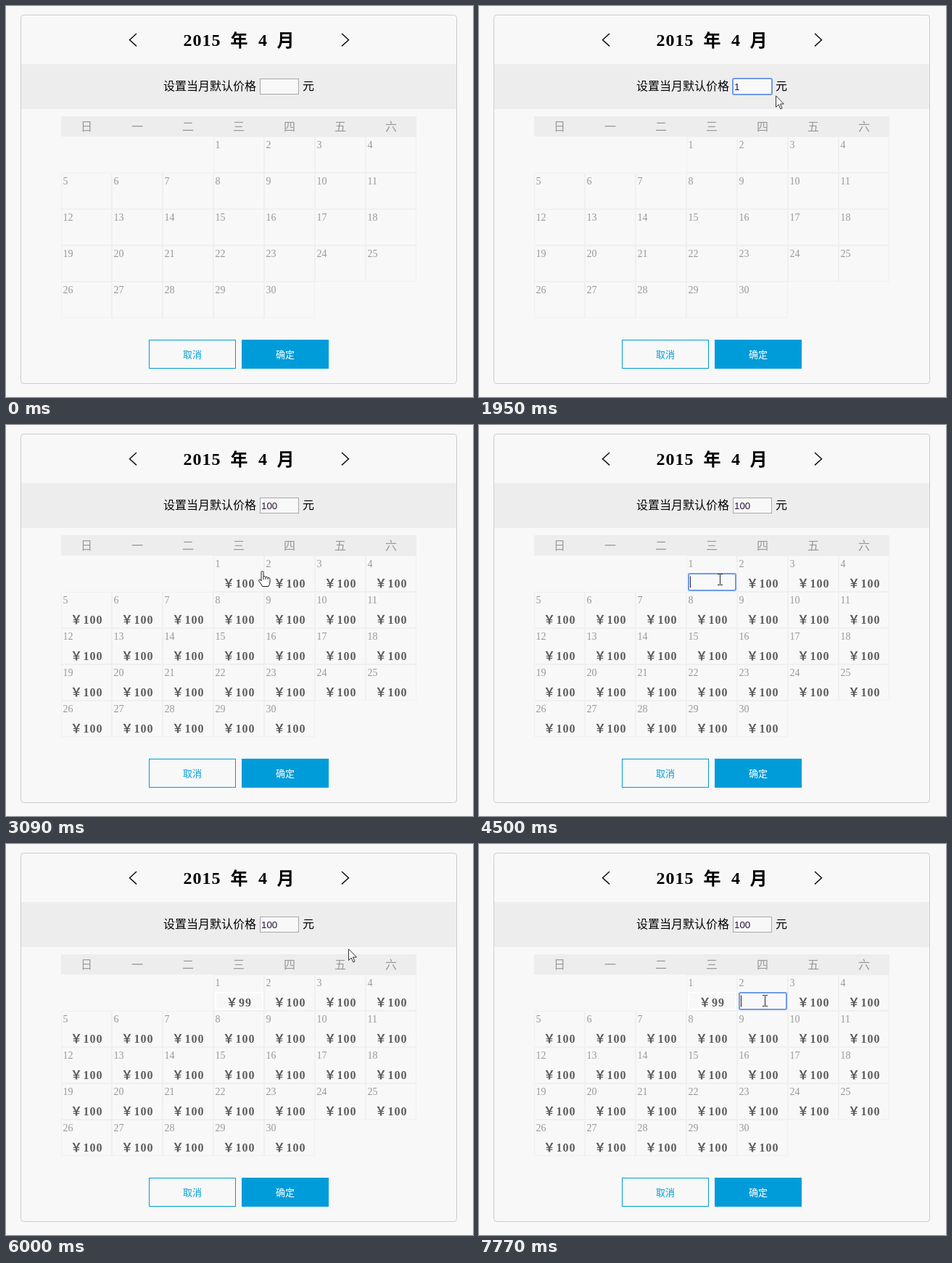
An HTML page for the animation above (8000 ms loop, 644 px wide and 539 px high).

```html
<!DOCTYPE html>
<html lang="zh-CN">
<head>
<meta charset="utf-8">
<title>价格日历</title>
<style>
  html, body { margin: 0; width: 100%; height: 100%; overflow: hidden; background: #f8f8f8; }
  svg { display: block; width: 644px; height: 539px; }
  text { font-family: "Noto Sans CJK SC", "Noto Sans CJK", sans-serif; font-size: 16px; }
  .mid { text-anchor: middle; }
  .num { font-family: "Liberation Serif", serif; }
  .title { font-size: 24px; font-weight: 700; letter-spacing: 1px; }
  .day { font-size: 14px; fill: #999; }
  .week { fill: #999; }
  .price { fill: #5c5c5c; font-weight: 700; }
  .price.num { letter-spacing: 1px; }
  .btn { font-size: 13px; }
  .value { font-family: "Liberation Sans", Arial, sans-serif; font-size: 13.333px; fill: #2a1440; }
</style>
</head>
<body>
<svg id="stage" viewBox="0 0 644 539"></svg>
<script>
const LOOP = 8000, STEP = 30, BLINK = 480, BLUE = '#009cd9';
const stage = document.getElementById('stage');

function add(tag, attrs, parent = stage) {
  const el = document.createElementNS('http://www.w3.org/2000/svg', tag);
  for (const k in attrs) el.setAttribute(k, attrs[k]);
  return parent.appendChild(el);
}
const group = (parent) => add('g', {}, parent);
const show = (el, on) => el.setAttribute('visibility', on ? 'visible' : 'hidden');

function box(x, y, width, height, fill, stroke, rx = 0, parent = stage) {
  const o = stroke ? 0.5 : 0;
  return add('rect', { x: x + o, y: y + o, width: width - 2 * o, height: height - 2 * o,
    fill, stroke: stroke || 'none', rx }, parent);
}
function label(str, x, y, cls = '', parent = stage, fill) {
  const el = add('text', { x, y, class: cls }, parent);
  if (fill) el.style.fill = fill;
  el.textContent = str;
  return el;
}
function line(d, parent = stage, stroke = '#111', width = 1.5, fill = 'none') {
  return add('path', { d, fill, stroke, 'stroke-width': width }, parent);
}

// Panel
box(20, 12, 602, 509, '#f8f8f8', '#ccc', 4);
box(21, 80, 600, 62, '#ededed');
line('M180 38L170.5 46.7L180 55.4M463 38L472.5 46.7L463 55.4');
label('2015', 244.5, 55, 'title num');
label('年', 309.5, 56, 'title');
label('4', 348, 55, 'title num');
label('月', 373.5, 56, 'title');
label('设置当月默认价格', 217, 116);
label('元', 409, 116);

// Calendar
box(76, 152, 490, 28, '#ededed');
[...'日一二三四五六'].forEach((c, i) => label(c, 111 + 70 * i, 172, 'week mid'));

const cellX = (day) => 76 + 70 * ((day + 2) % 7);
const cellY = (day) => 180 + 50 * Math.floor((day + 2) / 7);

function price(day, amount, parent) {
  const x = cellX(day) + 35 - (17 + 9 * amount.length) / 2, y = cellY(day) + 44;
  const g = group(parent);
  label('￥', x, y, 'price', g);
  label(amount, x + 17.5, y, 'price num', g);
  return g;
}
for (let d = 1; d <= 30; d++) {
  box(cellX(d), cellY(d), 70, 50, 'none', '#f0f0f0');
  label(d, cellX(d) + 2.5, cellY(d) + 16, 'day num');
}
const prices = group();
const first = price(1, '100', prices);
const second = price(2, '100', prices);
for (let d = 3; d <= 30; d++) price(d, '100', prices);
const changed = group();
add('rect', { x: 289, y: 205, width: 65, height: 23, fill: 'none', stroke: '#fff', 'stroke-width': 2 }, changed);
price(1, '99', changed);

// Buttons
box(197, 460, 120, 40, '#f8f8f8', BLUE);
box(325, 460, 120, 40, BLUE);
label('取消', 257, 485, 'btn mid', stage, BLUE);
label('确定', 385, 485, 'btn mid', stage, '#fff');

// Text fields; typed holds [time, value], caret restarts its blink at each time in marks
function field(x, y, w, h, opts) {
  const g = group();
  const plain = box(x, y, w, h, '#f8f8f8', '#a9a9a9', 0, g);
  const ring = group(g);
  add('rect', { x, y, width: w, height: h, rx: 2, fill: '#f9f9f9', stroke: '#6f9be6', 'stroke-width': 2 }, ring);
  const value = label('', x + 2, y + h / 2 + 5, 'value', g);
  const caret = box(x + 2, y + h / 2 - 8, 1, 16, '#222', null, 0, g);
  return { x, y, w, h, g, plain, ring, value, caret, ...opts };
}
const fields = [
  field(350, 100, 54, 22, { focus: 1020, blur: 2610, stays: true, marks: [1020, 1320, 2040, 2190],
    typed: [[1290, '1'], [2040, '10'], [2190, '100']] }),
  field(289, 205, 65, 23, { focus: 3510, blur: 5820, marks: [3540, 4830, 4980],
    typed: [[4830, '9'], [4980, '99']] }),
  field(359, 205, 65, 23, { focus: 6780, blur: LOOP, marks: [6810], typed: [] })
];
const focused = (f, t) => t >= f.focus && t < f.blur;

function drawField(f, t) {
  const on = focused(f, t);
  const text = f.typed.reduce((s, [at, v]) => t >= at ? v : s, '');
  const mark = f.marks.reduce((m, at) => t >= at ? at : m, Infinity);
  show(f.g, on || f.stays);
  show(f.plain, f.stays);
  show(f.ring, on);
  f.value.textContent = text;
  f.value.setAttribute('visibility', on || f.stays ? 'visible' : 'hidden');
  f.caret.setAttribute('x', f.x + 2 + Math.floor(7.41 * text.length));
  show(f.caret, on && t >= mark && Math.floor((t - mark) / BLINK) % 2 === 0);
}

// Pointer shapes, each with its hot spot at 0,0
const pointer = group();
const shapes = { arrow: group(pointer), beam: group(pointer), hand: group(pointer) };
line('M.5 .8V16.4L4.2 12.9L6.8 18.9L9 18L6.4 12H11.4Z', shapes.arrow, '#333', 1, '#fff');
line('M-3 -7.5H-.5Q.5 -7.5 .5 -6.5V6.5Q.5 7.5 -.5 7.5H-3M4 -7.5H1.5Q.5 -7.5 .5 -6.5M4 7.5H1.5Q.5 7.5 .5 6.5',
  shapes.beam, '#222', 1);
line('M-2 14V2Q-2 .5 -.5 .5T1 2V8Q3.5 6.8 4 8.6Q6.5 7.6 7 9.4Q10 8.8 10 11.5V15Q10 18 8 21.5H-.5' +
  'Q-2 18 -5 14.5Q-6 12.5 -4.5 12T-2 14ZM1 8V12M4 8.6V12M7 9.4V12', shapes.hand, '#222', 1, '#fff');

const path = [
  [270, 619, 44], [390, 560, 62], [480, 455, 86], [570, 378, 104], [750, 384, 108], [1020, 397, 114],
  [1710, 398, 114], [1950, 409, 123], [2160, 455, 125], [2400, 496, 109],
  [2790, 496, 109], [2970, 430, 150], [3090, 354, 201], [3210, 332, 213],
  [4980, 332, 213], [5100, 353, 204], [5280, 451, 178], [5430, 480, 150], [5580, 489, 138],
  [5790, 489, 138], [6000, 472, 144], [6210, 440, 180], [6420, 404, 210], [6570, 394, 216]
];
const hiddenSpans = [[0, 270], [1080, 1710], [6810, 7620]];

function pointerAt(t) {
  const i = path.findIndex((p) => p[0] > t);
  if (i < 1) return path[i < 0 ? path.length - 1 : 0].slice(1);
  const [a, b] = [path[i - 1], path[i]];
  const k = (t - a[0]) / (b[0] - a[0]);
  return [1, 2].map((n) => Math.round(a[n] + (b[n] - a[n]) * k));
}
function drawPointer(t) {
  const [x, y] = pointerAt(t);
  const inside = (f) => x >= f.x && x < f.x + f.w && y >= f.y && y < f.y + f.h;
  const overField = fields.some((f) => inside(f) && (f.stays || (t >= f.focus + STEP && t < f.blur)));
  const kind = overField ? 'beam' : y >= 180 ? 'hand' : 'arrow';
  const visible = !hiddenSpans.some(([a, b]) => t >= a && t < b);
  pointer.setAttribute('transform', `translate(${x} ${y})`);
  for (const k in shapes) show(shapes[k], visible && k === kind);
}

function draw(now) {
  const t = Math.floor((now % LOOP) / STEP) * STEP;
  const priced = t >= 2610;
  show(prices, priced);
  show(first, priced && t < 3510);
  show(second, priced && t < 6780);
  show(changed, t >= 5820);
  fields.forEach((f) => drawField(f, t));
  drawPointer(t);
}
const start = performance.now();
function tick() {
  draw(performance.now() - start);
  requestAnimationFrame(tick);
}
tick();
</script>
</body>
</html>
```
